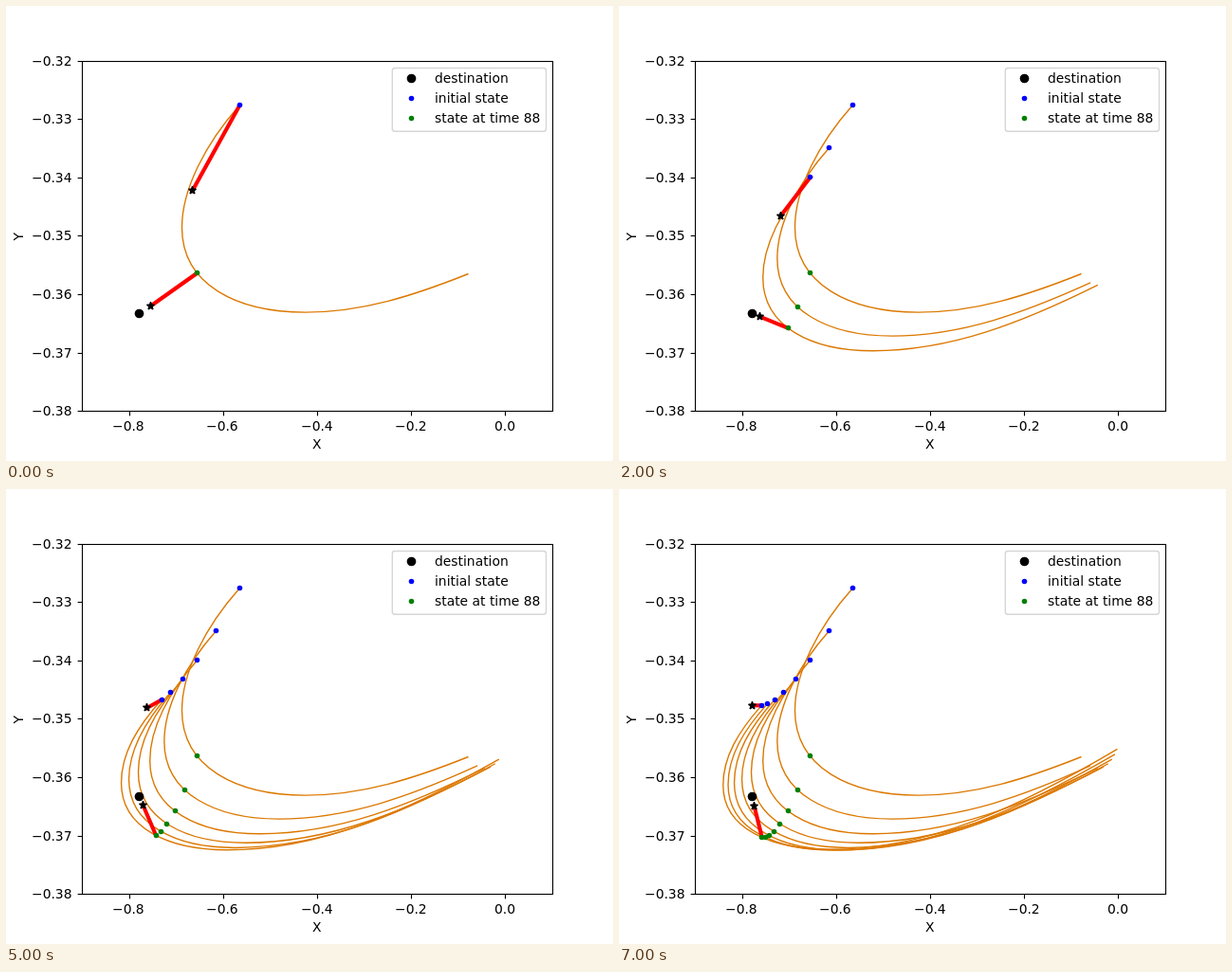
An HTML page with a canvas for the animation above (8000 ms loop, 640 by 480 pixels).

```html
<!DOCTYPE html>
<html lang="en">
<head>
<meta charset="utf-8">
<title>Trajectories</title>
<style>
  html, body { margin: 0; width: 100%; height: 100%; overflow: hidden; background: #fff; }
  canvas { display: block; }
</style>
</head>
<body>
<canvas id="plot" width="640" height="480"></canvas>
<script>
const ctx = document.getElementById('plot').getContext('2d');
const STEP = 1000, COUNT = 8;

// A value that settles exponentially, with an optional steady drift, over iterations k.
const settle = (from, gain, rate, drift = 0) =>
  k => from + gain * (1 - rate ** k) + drift * k;
const point = (x, y) => k => [x(k), y(k)];
const mix = (a, b, t) => a.map((v, i) => v + (b[i] - v) * t);

const start = point(settle(246, -119, 0.79), settle(104, 171.7, 0.71, -4.6));
const left = point(settle(185, -98.2, 0.81), settle(233, 95.8, 0.64, -1.8));
const bottom = point(settle(315, -105.9, 0.74), settle(322.6, 88, 0.675, -3.6));
const end = point(settle(487, 48, 0.8), settle(282, 34.4, 0.55, -6));
const lowStar = point(settle(152, -14.7, 0.85), settle(316, 18.5, 0.63));
const stateTime = settle(0.316, 0.288, 0.76);

// Each step moves the start halfway to its star.
const topStar = k => mix(start(k), start(k + 1), 2);

function bezierPoint(a, b, c, d, t) {
  const ab = mix(a, b, t), bc = mix(b, c, t), cd = mix(c, d, t);
  return mix(mix(ab, bc, t), mix(bc, cd, t), t);
}

function makeRun(k) {
  const s = start(k), l = left(k), b = bottom(k), e = end(k);
  const drop = 0.68 * (b[1] - l[1]);
  const lean = 0.6 * (s[0] - l[0]);
  const dx = e[0] - b[0], dy = e[1] - b[1];
  const bend = [l, [l[0], l[1] + drop], mix(b, [l[0], b[1]], 0.55), b];

  const path = new Path2D();
  path.moveTo(...s);
  path.bezierCurveTo(s[0] - lean, s[1] + 1.12 * lean, l[0], l[1] - 0.65 * drop, ...l);
  path.bezierCurveTo(...bend[1], ...bend[2], ...b);
  path.bezierCurveTo(b[0] + 0.35 * dx, b[1], e[0] - 0.33 * dx, e[1] - 0.56 * dy, ...e);

  return {
    path, start: s, state: bezierPoint(...bend, stateTime(k)),
    topStar: topStar(k), lowStar: lowStar(k)
  };
}
const runs = Array.from({ length: COUNT }, (_, k) => makeRun(k));

function dot([x, y], r, color) {
  ctx.fillStyle = color;
  ctx.beginPath();
  ctx.arc(x, y, r, 0, 2 * Math.PI);
  ctx.fill();
}
const marker = ([x, y], r, color) => dot([Math.round(x), Math.round(y)], r, color);

function star(p) {
  const [x, y] = p.map(Math.round);
  ctx.beginPath();
  for (let i = 0; i < 10; i++) {
    const r = i % 2 ? 1.59 : 4.17, a = i * Math.PI / 5;
    ctx.lineTo(x + r * Math.sin(a), y - r * Math.cos(a));
  }
  ctx.closePath();
  ctx.fillStyle = ctx.strokeStyle = '#000';
  ctx.lineWidth = 1.39;
  ctx.lineJoin = 'bevel';
  ctx.fill();
  ctx.stroke();
}

function line([x1, y1], [x2, y2], color, width) {
  ctx.strokeStyle = color;
  ctx.lineWidth = width;
  ctx.beginPath();
  ctx.moveTo(x1, y1);
  ctx.lineTo(x2, y2);
  ctx.stroke();
}

// Text starts on a whole pixel; anchor is 0 for left, 0.5 for centre, 1 for right.
function text(str, x, y, anchor) {
  ctx.fillStyle = '#000';
  ctx.fillText(str, Math.floor(x - anchor * ctx.measureText(str).width), y);
}

const label = (v, digits) => v.toFixed(digits).replace('-', '\u2212');
const snap = v => Math.floor(v + 0.5) + 0.5;

function drawAxes() {
  ctx.font = '13.89px "DejaVu Sans", sans-serif';
  for (let i = 0; i < 5; i++) {
    const x = 129.6 + 99.2 * i;
    line([snap(x), 427.5], [snap(x), 432.4], '#000', 1.11);
    text(label((i - 4) / 5, 1), x, 448, 0.5);
  }
  for (let i = 0; i < 7; i++) {
    const y = 57.6 + 61.6 * i;
    line([75.6, snap(y)], [80.5, snap(y)], '#000', 1.11);
    text(label(-0.32 - i / 100, 2), 70.3, Math.round(y + 5), 1);
  }
  ctx.strokeStyle = '#000';
  ctx.lineWidth = 1.11;
  ctx.lineJoin = 'miter';
  ctx.strokeRect(80.5, 58.5, 496, 369);
  text('X', 328, 467, 0.5);
  ctx.save();
  ctx.translate(18, 242.4);
  ctx.rotate(-Math.PI / 2);
  text('Y', 0, 0, 0.5);
  ctx.restore();
}

function drawLegend() {
  ctx.beginPath();
  ctx.roundRect(407.3, 65.5, 162.2, 66.7, 2.8);
  ctx.fillStyle = 'rgba(255,255,255,0.8)';
  ctx.fill();
  ctx.strokeStyle = '#d6d6d6';
  ctx.lineWidth = 1.39;
  ctx.stroke();
  const rows = [['destination', 4.86, '#000'], ['initial state', 2.78, '#00f'], ['state at time 88', 2.78, '#008000']];
  rows.forEach(([name, r, color], i) => {
    dot([427.5, 76.5 + 21 * i], r, color);
    text(name, 452, 81 + 21 * i, 0);
  });
}

function draw(last) {
  const shown = runs.slice(0, last + 1), current = runs[last];
  ctx.fillStyle = '#fff';
  ctx.fillRect(0, 0, 640, 480);

  ctx.save();
  ctx.translate(0.5, 0.5);
  ctx.strokeStyle = '#dc7800';
  ctx.lineWidth = 1.39;
  for (const run of shown) ctx.stroke(run.path);
  ctx.lineCap = 'square';
  line(current.start, current.topStar, '#f00', 4.17);
  line(current.state, current.lowStar, '#f00', 4.17);
  ctx.lineCap = 'butt';
  marker([140, 324], 4.86, '#000');
  for (const run of shown) {
    marker(run.start, 2.78, '#00f');
    marker(run.state, 2.78, '#008000');
  }
  star(current.topStar);
  star(current.lowStar);
  ctx.restore();

  drawAxes();
  drawLegend();
}

const origin = performance.now();
function tick() {
  draw(Math.floor((performance.now() - origin) / STEP) % COUNT);
  requestAnimationFrame(tick);
}
tick();
</script>
</body>
</html>
```
